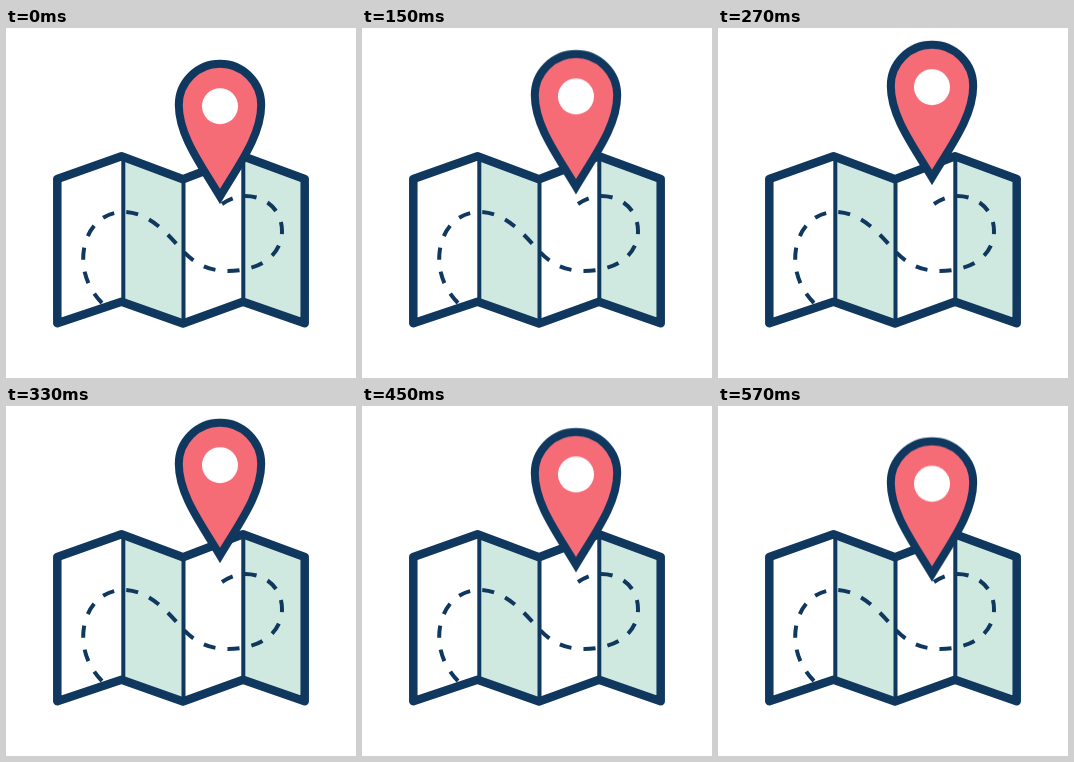
These frames come from a looping animation (350x350 px, 600 ms). An HTML page:

```html
<!DOCTYPE html>
<html lang="en">
<head>
<meta charset="utf-8">
<title>Map pin</title>
<style>
  html, body { margin: 0; width: 100%; height: 100%; overflow: hidden; background: #fff; }
  svg { display: block; width: 100vw; height: 100vh; }
  .line { fill: none; stroke: #10385f; }
</style>
</head>
<body>
<svg viewBox="0 0 350 350">
  <g id="map">
    <path fill="#cfe8e0" d="M117 128L177.500 151V295.500L117 273.500ZM237 128L299 151V295.500L237 273.500Z"/>
    <path class="line" stroke-width="4" d="M117.300 129V273M177.500 151V295M237.300 129V273"/>
    <path class="line" stroke-width="8.500" stroke-linejoin="round"
      d="M51.300 151L115.500 128.300L177 151.200L237 128.300L298.700 151V295.200L237 273.700L177 295.500L115.500 273.700L51.300 295.200Z"/>
    <path class="line" stroke-width="4" pathLength="396" stroke-dasharray="12 12"
      d="M96 275C80 259 75 238 78 221C82 198 98 183 120 184C146 186 163 208 178 224C192 239 207 243 222 243C254 243 276 227 276 203C276 183 261 168 239 168C230 168 222 172 216 176"/>
  </g>
  <g id="pin">
    <path fill="#f56c77" stroke="#10385f" stroke-width="8" stroke-miterlimit="10"
      d="M214 168.500C196 138 172.800 108 172.800 77A41.200 41.200 0 0 1 255.200 77C255.200 108 232 138 214 168.500Z"/>
    <circle cx="214" cy="78.200" r="18" fill="#fff"/>
  </g>
</svg>
<script>
  const LOOP = 600, STEPS = 20, RISE = 9.8;

  // Sine bob, held for 30 ms per step
  const bob = Array.from({ length: STEPS + 1 }, (_, i) => {
    const y = RISE * (Math.cos(2 * Math.PI * i / STEPS) - 1);
    return {
      offset: i / STEPS,
      transform: `translate(0px, ${y.toFixed(3)}px)`,
      easing: 'steps(1, end)'
    };
  });

  document.getElementById('pin').animate(bob, { duration: LOOP, iterations: Infinity });
</script>
</body>
</html>
```
